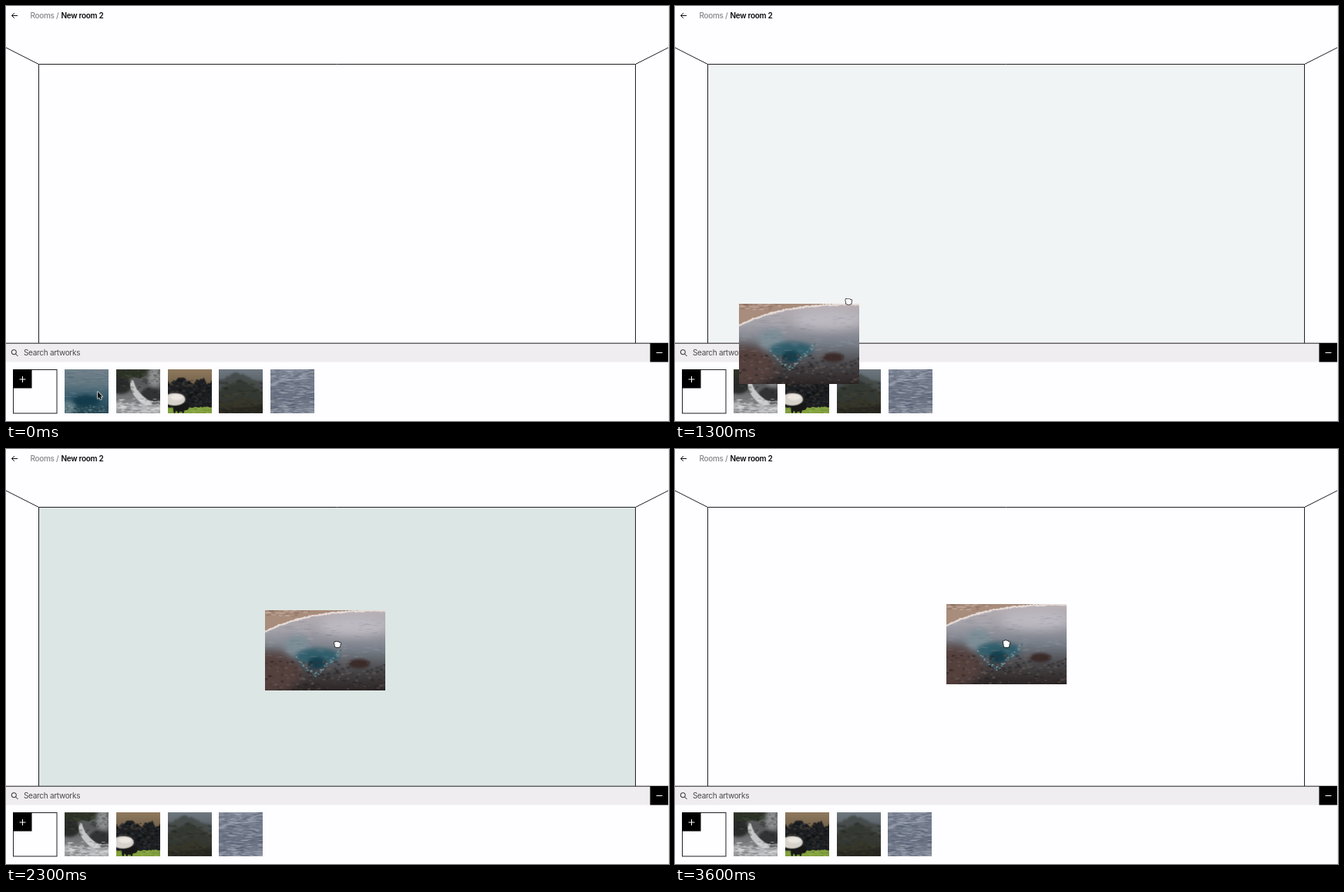
An HTML page with a canvas that plays this animation: 860x538 px, repeating every 3.7 s.

```html
<!DOCTYPE html>
<html lang="en">
<head>
<meta charset="utf-8">
<title>Room editor</title>
<style>
  html, body { margin: 0; width: 100%; height: 100%; overflow: hidden; background: #fefdff; }
  canvas { display: block; width: 860px; height: 538px; }
</style>
</head>
<body>
<canvas id="stage" width="860" height="538"></canvas>
<script>
const ctx = document.getElementById('stage').getContext('2d');
ctx.imageSmoothingQuality = 'high';
const LOOP = 3700, STEP = 100, PAPER = '#fefdff', INK = '#0b0a0b', EDGE = '#222122';
const THUMB = 57, PITCH = 66.8, ROW_X = 76, ROW_Y = 471;

const clamp = v => Math.max(0, Math.min(1, v));
const ramp = (t, a, b) => clamp((t - a) / (b - a));
const smooth = p => p * p * (3 - 2 * p);
const mix = (a, b, p) => a + (b - a) * p;

function seeded(seed) {
  return () => (seed = (seed * 16807) % 2147483647) / 2147483647;
}

// ---- pictures ----
function picture(w, h, paint) {
  const c = document.createElement('canvas');
  c.width = w * 2;
  c.height = h * 2;
  const g = c.getContext('2d');
  g.scale(2, 2);
  paint(g, w, h);
  return c;
}

function fade(g, w, h, ...colors) {
  const grad = g.createLinearGradient(0, 0, 0, h);
  colors.forEach((c, i) => grad.addColorStop(i / (colors.length - 1), c));
  g.fillStyle = grad;
  g.fillRect(0, 0, w, h);
}

function oval(g, color, x, y, rx, ry, blur = 0) {
  g.filter = blur ? `blur(${blur}px)` : 'none';
  g.fillStyle = color;
  g.beginPath();
  g.ellipse(x, y, rx, ry, 0, 0, 7);
  g.fill();
  g.filter = 'none';
}

// Fills from a curve y = edge(x), roughened, to the given side
function land(g, color, w, side, edge, rough = 1, blur = 1) {
  const rnd = seeded(Math.round(side + edge(0) * 7) + 50);
  g.filter = `blur(${blur}px)`;
  g.fillStyle = color;
  g.beginPath();
  g.moveTo(-9, side);
  for (let x = -9; x <= w + 9; x += 2) g.lineTo(x, edge(x) + (rnd() - .5) * 2 * rough);
  g.lineTo(w + 9, side);
  g.fill();
  g.filter = 'none';
}

// Scattered flecks over a horizontal strip
function flecks(g, n, w, top, bottom, colors, size, flat = .5, alpha = .4) {
  const rnd = seeded(n);
  g.globalAlpha = alpha;
  for (let i = 0; i < n; i++) {
    const r = size * (.4 + rnd());
    oval(g, colors[i % colors.length], rnd() * w, mix(top, bottom, rnd()), r, r * flat);
  }
  g.globalAlpha = 1;
}

const pool = picture(156, 103, (g, w, h) => {
  fade(g, w, h, '#bab2b6', '#a3a0a8', '#767d87', '#48474a', '#2b2525');
  oval(g, '#bdbac2', 115, 20, 45, 12, 12);
  oval(g, '#54413e', 5, 80, 42, 28, 12);
  oval(g, '#7d8e97', 42, 46, 16, 14, 8);
  oval(g, '#315e6b', 68, 59, 28, 10, 6);
  oval(g, '#173f4e', 67, 68, 11, 8, 4);
  oval(g, '#3a2b29', 122, 69, 14, 6, 3);
  flecks(g, 260, w, 66, h, ['#1f1b1c', '#6f6360', '#40302d'], 2, .6);
  flecks(g, 200, w, 12, 62, ['#c9c7ce', '#5e6a75'], 4, .1, .22);
  // Pale crust along the lower lip of the pool
  const rnd = seeded(5);
  for (let i = 0; i < 70; i++) {
    const p = rnd();
    const y = 80 - 26 * Math.pow(Math.abs(p - .42) / .5, 1.2);
    oval(g, i % 2 ? '#76949b' : '#42606a', mix(40, 98, p), y + rnd() * 6, 1.3, .8);
  }
  const shore = x => 27 * Math.pow(1 - x / 190, 3.4);
  land(g, '#e6dcd8', w, 0, x => shore(x) + 1.5, .8, .6);
  land(g, '#a88c7c', w, 0, x => shore(x) - 1, .8, .6);
  flecks(g, 40, 60, 0, 9, ['#7d6153', '#d6c5b8'], 3, .25);
});

const poolThumb = picture(THUMB, THUMB, (g, w, h) => {
  fade(g, w, h, '#72808a', '#617680', '#34596a', '#2b4a56');
  oval(g, '#133a4a', 28, 41, 18, 8, 6);
  oval(g, '#647f88', 3, 50, 11, 9, 5);
  flecks(g, 110, w, 2, 36, ['#8a98a2', '#3f606f'], 4, .1, .3);
  flecks(g, 90, w, 46, h, ['#86999e', '#1f3c46'], 1.4, .6);
});

const falls = picture(THUMB, THUMB, (g, w, h) => {
  fade(g, w, h, '#5d605c', '#55575a', '#77797b', '#a3a4a6');
  land(g, '#2d3226', w, 0, x => 15 - x * .13, 2, 1.5);
  oval(g, '#2a2c2b', 6, 21, 14, 11, 3);
  oval(g, '#303234', 46, 34, 15, 11, 3);
  oval(g, '#8e9092', 50, 9, 9, 14, 6);
  for (let p = 0; p < 1; p += .04) {
    oval(g, '#c6c8ca', 21 + 22 * p * p, mix(17, 46, p), 2 + 4 * p, 3, 1.5);
  }
  land(g, '#b4b5b8', w, h, x => 42 + x * .1, 2, 2);
  flecks(g, 130, w, 38, h, ['#dfe0e2', '#6c6e71'], 3, .3);
  flecks(g, 80, w, 0, 30, ['#4a5240', '#1b1f1b'], 2, .6, .3);
});

const sheep = picture(THUMB, THUMB, (g, w, h) => {
  fade(g, w, h, '#8f7a5f', '#74624c', '#2a2a2a', '#1b1c1d');
  land(g, '#1c1e21', w, h, x => 15 + 3 * Math.sin(x * .25), 4);
  flecks(g, 160, w, 14, 46, ['#42454a', '#08090b', '#4a4139'], 2, .6);
  land(g, '#829f3f', w, h, x => 50 - x * .02, .8, .6);
  flecks(g, 70, w, 50, h, ['#a0bd50', '#587a2c'], 1.5, .4);
  oval(g, '#171717', 16, 49, 9, 6, 1);
  oval(g, '#171717', 24, 48, 4, 5, .6);
  oval(g, '#d6d1ca', 9, 39, 14, 8, 1);
  oval(g, '#ebe6df', 12, 36, 9, 4, 2);
  for (const x of [9, 14, 20]) oval(g, '#171717', x, 53, 1.5, 4);
});

const mountain = picture(THUMB, THUMB, (g, w, h) => {
  fade(g, w, h, '#6f7880', '#586066', '#3a3d38', '#2c2d27');
  const peak = (top, at, slope) => x => top + Math.abs(x - at) * slope;
  land(g, '#464c4c', w, h, peak(4, 24, .42), 1.5, 2);
  land(g, '#343832', w, h, peak(14, 27, .5), 1.5, 2);
  land(g, '#35352a', w, h, x => 40 + 3 * Math.sin(x * .15), 1, 2);
  land(g, '#26251f', w, h, x => 51 - x * .06, 1, 2);
  flecks(g, 110, w, 14, h, ['#4a4937', '#1f2420'], 3, .4, .28);
});

const waves = picture(THUMB, THUMB, (g, w, h) => {
  fade(g, w, h, '#8b92a0', '#767e8d', '#6b7383', '#858b98');
  flecks(g, 420, w, 0, h, ['#b4b8c3', '#4c566a', '#667083'], 4, .15, .5);
});

const others = [falls, sheep, mountain, waves];

// ---- motion ----
const stops = [[119, 504], [106, 503], [253, 361], [430, 253]];
const strokes = [[0, 500], [780, 1500], [1550, 2200]];

// Each stroke eases to the next stop, the height a little ahead
function pointerAt(t) {
  let [x, y] = stops[0];
  strokes.forEach(([from, to], i) => {
    const p = smooth(ramp(t, from, to)), next = stops[i + 1];
    x = mix(x, next[0], p);
    y = mix(y, next[1], Math.pow(p, .8));
  });
  return [x, y];
}

const LAG = 220;
const artworkAt = t => pointerAt(Math.max(500, t - LAG));

// ---- interface ----
function line(color, width, ...pts) {
  ctx.strokeStyle = color;
  ctx.lineWidth = width;
  ctx.beginPath();
  for (let i = 0; i < pts.length; i += 2) ctx.lineTo(pts[i], pts[i + 1]);
  ctx.stroke();
}

function box(color, x, y, w, h) {
  ctx.fillStyle = color;
  ctx.fillRect(x, y, w, h);
}

function label(text, x, y, color, weight) {
  ctx.font = `${weight} 10px Inter, "Liberation Sans", sans-serif`;
  ctx.letterSpacing = '-0.3px';
  ctx.fillStyle = color;
  ctx.fillText(text, x, y);
}

function drawRoom(tint) {
  box(PAPER, 0, 0, 860, 538);
  ctx.globalAlpha = tint;
  box('#dce6e4', 43, 76, 773, 361);
  ctx.globalAlpha = 1;
  for (const [corner, side] of [[42.5, 0], [816.5, 859]]) {
    line(EDGE, 1, side, 54, corner, 75.5, corner, 437);
  }
  line(EDGE, 1, 42.5, 75.5, 816.5, 75.5);
  line(INK, 1, 15, 12.5, 7.5, 12.5);
  line(INK, 1, 10.8, 9.2, 7.5, 12.5, 10.8, 15.8);
  label('Rooms /', 31.5, 16, '#878587', 500);
  label('New room 2', 71.5, 16, INK, 600);
}

function plus(x, y, arms) {
  line('#fff', 1, x - 4, y, x + 4, y);
  if (arms > 2) line('#fff', 1, x, y - 4, x, y + 4);
}

function drawPanel() {
  box('#efedf0', 0, 437, 860, 24.5);
  line(EDGE, 1, 0, 437.2, 860, 437.2);
  box('#000', 835.5, 437, 24, 24.5);
  plus(847.5, 449.5, 2);
  ctx.strokeStyle = '#252425';
  ctx.beginPath();
  ctx.arc(10.3, 448.7, 3.1, 0, 7);
  ctx.stroke();
  line('#252425', 1, 12.5, 451, 15.5, 454);
  label('Search artworks', 23, 453.3, '#4b494b', 400);
  ctx.strokeStyle = EDGE;
  ctx.strokeRect(9.5, ROW_Y + .5, 56.5, 56.5);
  box('#000', 9, ROW_Y, 24.5, 24.5);
  plus(21.5, 484, 4);
  box('#e9e8ea', 859, 0, 1, 538);
}

function drawThumbs(t) {
  const slide = t < 650 ? 0 : 1 - Math.exp((650 - t) / 115);
  ctx.globalAlpha = 1 - ramp(t, 600, 720);
  ctx.drawImage(poolThumb, ROW_X, ROW_Y, THUMB, THUMB);
  ctx.globalAlpha = 1;
  others.forEach((img, i) => {
    ctx.drawImage(img, ROW_X + PITCH * (i + 1 - slide), ROW_Y, THUMB, THUMB);
  });
}

function drawArtwork(t) {
  const [x, y] = artworkAt(t);
  const size = mix(.6, 1, 1 - Math.pow(1 - ramp(t, 600, 900), 2.4));
  const w = 156 * size, h = 103.5 * size;
  ctx.globalAlpha = ramp(t, 650, 1150);
  ctx.drawImage(pool, x - w / 2, y - h / 2, w, h);
  ctx.globalAlpha = 1;
}

const arrow = new Path2D('M0-4V5L2 3.2 3.3 6.2 4.9 5.5 3.6 2.6H6.3Z');

// A palm with four fingers, curled while holding
function hand(reach) {
  const path = new Path2D();
  path.roundRect(-3.5, -2, 7, 6, 2);
  for (let i = 0; i < 4; i++) {
    const tall = reach + Math.sin(i + .6);
    path.roundRect(-4 + i * 2, -1.5 - tall, 2, tall + 2, 1);
  }
  return path;
}
const fist = hand(1), palm = hand(2.5);

function drawPointer(t) {
  const pressed = t >= 600;
  const form = !pressed ? arrow : t < 2700 ? fist : palm;
  ctx.save();
  ctx.translate(...pointerAt(t));
  ctx.lineJoin = 'round';
  ctx.lineWidth = 1.4;
  ctx.strokeStyle = pressed ? '#111' : '#e8e8e8';
  ctx.fillStyle = pressed ? '#fff' : '#111';
  ctx.stroke(form);
  ctx.fill(form);
  ctx.restore();
}

function draw(t) {
  const tint = smooth(ramp(t, 1150, 1500)) * (1 - ramp(t, 2700, 3000));
  drawRoom(tint);
  drawPanel();
  drawThumbs(t);
  drawArtwork(t);
  drawPointer(t);
}

// The picture advances in steps of a tenth of a second
function tick() {
  const t = (performance.now() + 4) % LOOP;
  draw(Math.floor(t / STEP) * STEP);
  requestAnimationFrame(tick);
}
tick();
</script>
</body>
</html>
```
